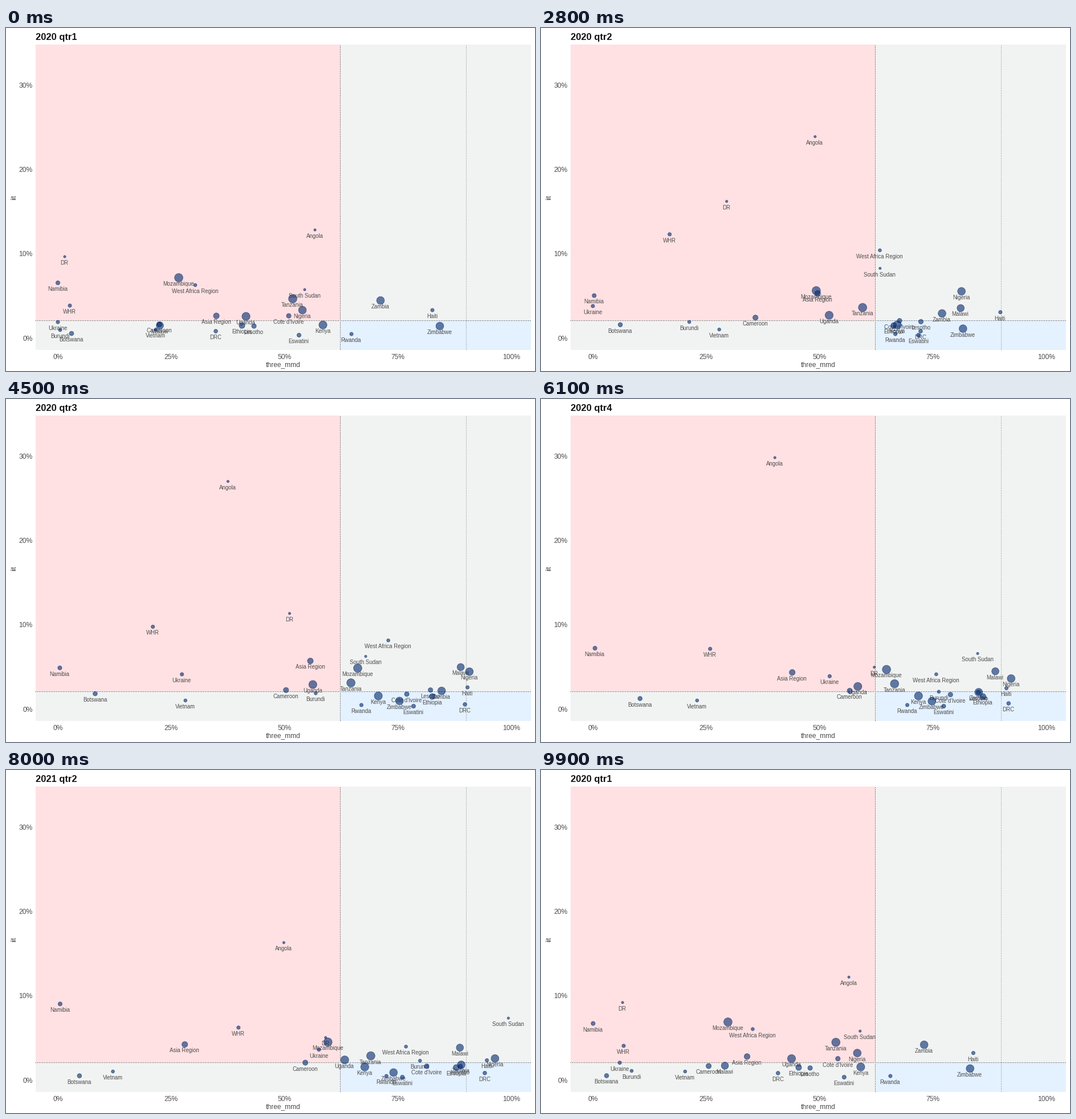
Write a matplotlib script that moves like this. It is 928 by 603 pixels and loops after 10000 ms.

```python
import numpy as np
import matplotlib.pyplot as plt
from matplotlib.animation import FuncAnimation
from matplotlib.patches import Rectangle

W, H, DPI = 928, 603, 64
PT = 72 / DPI  # points per pixel

FRAMES, INTERVAL = 100, 100
HOLD_END = 5   # last still frame of the first quarter
PERIOD = 17    # frames from one quarter to the next
MOVE = 11      # frames spent moving
LAST_MOVE = 10

QUARTERS = ["2020 qtr1", "2020 qtr2", "2020 qtr3",
            "2020 qtr4", "2021 qtr1", "2021 qtr2"]
LAST = len(QUARTERS) - 1
ROLLOUT = np.array([0, 0.27, 0.82, 0.88, 0.95, 1])  # shared pace of uptake

LEFT, RIGHT, TOP, BOTTOM = 52, 921, 29, 566
SPLIT_X, SPLIT_Y = 587, 514
PINK, GREY, BLUE = "#ffe1e3", "#f1f3f2", "#e4f1ff"
NAVY, TEXT, LINE = "#002668", "#4d4d4d", "#222222"
STROKE = 0.8

names, sizes, paths = [], [], []


def spread(*keys):
    """Turn a few key values into one value per quarter.

    One key stays still and two follow the rollout. More keys cover the
    first quarters, and the final key is reached evenly in the last one.
    """
    if len(keys) == 2:
        return keys[0] + (keys[1] - keys[0]) * ROLLOUT
    knots = [*range(len(keys) - 1), LAST]
    return np.interp(range(LAST + 1), knots, keys)


def country(name, size, x, y):
    names.append(name)
    sizes.append(size)
    paths.append(np.column_stack([x, y]))


country("Angola", 5, spread(542, 603, 379, 398, 425, 523),
        spread(355, 245, 146, 144, 54, 446))
country("Asia Region", 11, spread(369, 404, 553, 518, 348, 294),
        spread(506, 502, 437, 480, 483))
country("Botswana", 8.5, spread(115, 168, 115, 191, 115),
        spread(537, 532, 513, 541))
country("Burundi", 6.5, spread(95, 127, 371, 687, 735),
        spread(531, 514, 519, 510))
country("Cameroon", 10, spread(269, 320, 423, 548, 520),
        spread(521, 507, 511, 515))
country("Cote d'Ivoire", 9, spread(496, 551, 694, 744), spread(506, 521))
country("DR", 5, spread(103, 155, 468, 522, 660, 504),
        spread(402, 355, 263, 472, 470))
country("DRC", 7.5, spread(368, 510, 796, 846), spread(533, 527, 538, 532))
country("Eswatini", 8, spread(514, 593, 720, 692), spread(540))
country("Ethiopia", 11, spread(414, 496, 721, 770, 794), spread(523))
country("Haiti", 7, spread(748, 796, 814, 806, 852),
        spread(496, 492, 506, 511))
country("Kenya", 15, spread(556, 593, 652, 654, 672, 605), spread(522))
country("Lesotho", 9, spread(435, 589, 731, 806), spread(524, 525, 509, 523))
country("Malawi", 13.5, spread(270, 662, 798, 796),
        spread(523, 523, 467, 491))
country("Mozambique", 15.5, spread(303, 329, 611, 622, 552),
        spread(439, 479))
country("Namibia", 8, spread(91, 95), spread(448, 477, 465, 479, 389, 424))
country("Nigeria", 14.5, spread(520, 646, 814, 812, 868),
        spread(496, 452, 472, 512))
country("Rwanda", 7, spread(606, 633, 612, 675), spread(538))
country("South Sudan", 5, spread(524, 609, 583, 671, 880, 882),
        spread(460, 422, 423, 477, 412, 450))
country("Tanzania", 15.5, spread(503, 526, 596, 646), spread(476, 503))
country("Uganda", 15, spread(421, 470, 535, 541, 606),
        spread(507, 511, 500, 511))
country("Ukraine", 7, spread(91, 91, 91, 490, 562),
        spread(517, 497, 482, 493))
country("Vietnam", 6.5, spread(263, 299, 324, 307, 161), spread(530))
country("West Africa Region", 6.5, spread(332, 577, 609, 722, 659, 726),
        spread(452, 435, 354, 483, 487))
country("WHR", 7, spread(112, 182, 262, 254, 442),
        spread(488, 366, 360, 434, 457))
country("Zambia", 14.5, spread(657, 619, 774, 756, 808), spread(479, 519))
country("Zimbabwe", 14.5, spread(761, 797, 693, 678), spread(524, 532))

paths = np.array(paths)

plt.rcParams["font.family"] = "Liberation Sans"
fig = plt.figure(figsize=(W / DPI, H / DPI), dpi=DPI, facecolor="white")
ax = fig.add_axes([0, 0, 1, 1])
ax.set_xlim(0, W)
ax.set_ylim(H, 0)
ax.axis("off")


def panel(x0, y0, x1, y1, color):
    ax.add_patch(Rectangle((x0, y0), x1 - x0, y1 - y0, fc=color, lw=0))


def dotted(xs, ys, color):
    # Unsnapped, so each dot fills exactly one pixel.
    ax.plot(xs, ys, color=color, lw=PT, ls=(0, (1, 2)),
            dash_capstyle="butt", snap=False, zorder=2)


def label(x, y, s, px, color=TEXT, **kw):
    return ax.text(x, y, s, fontsize=px * PT, color=color,
                   va="baseline", **kw)


panel(LEFT, TOP, RIGHT, BOTTOM, GREY)
panel(LEFT, TOP, SPLIT_X, SPLIT_Y, PINK)
panel(SPLIT_X, SPLIT_Y, RIGHT, BOTTOM, BLUE)
dotted((LEFT, RIGHT), (SPLIT_Y + 0.5,) * 2, LINE)
dotted((SPLIT_X - 0.5,) * 2, (BOTTOM, TOP), LINE)
dotted((807.5, 807.5), (BOTTOM, TOP), "#777777")

for pct in range(0, 101, 25):
    label(90.8 + 7.96 * pct, 582, f"{pct}%", 12, ha="center")
for pct in range(0, 31, 10):
    label(46.5, 549.5 - 14.82 * pct, f"{pct}%", 12, ha="right")
label(486, 595, "three_mmd", 12, ha="center")
label(17, 298, "iit", 12, ha="center", rotation=90, rotation_mode="anchor")
title = label(52, 21, QUARTERS[0], 16.5, "#111111", weight="bold")

tags = [label(0, 0, name, 9.6, ha="center", zorder=3) for name in names]
dots = ax.scatter(*paths[:, 0].T, s=((np.array(sizes) - STROKE) * PT) ** 2,
                  c=NAVY, edgecolors=NAVY, alpha=0.6,
                  linewidths=STROKE * PT, zorder=4)


def draw(frame):
    quarter, step = divmod(max(frame - HOLD_END, 0), PERIOD)
    after = (quarter + 1) % len(QUARTERS)
    t = min(step / (MOVE if after else LAST_MOVE), 1)

    spots = paths[:, quarter] * (1 - t) + paths[:, after] * t
    dots.set_offsets(spots)
    for tag, (x, y) in zip(tags, spots):
        tag.set_position((x - 0.5, y + 14))
    title.set_text(QUARTERS[after if step > MOVE // 2 + 1 else quarter])
    return [dots, title, *tags]


anim = FuncAnimation(fig, draw, frames=FRAMES, interval=INTERVAL,
                     repeat=True, repeat_delay=0, blit=False)
plt.show()
```
